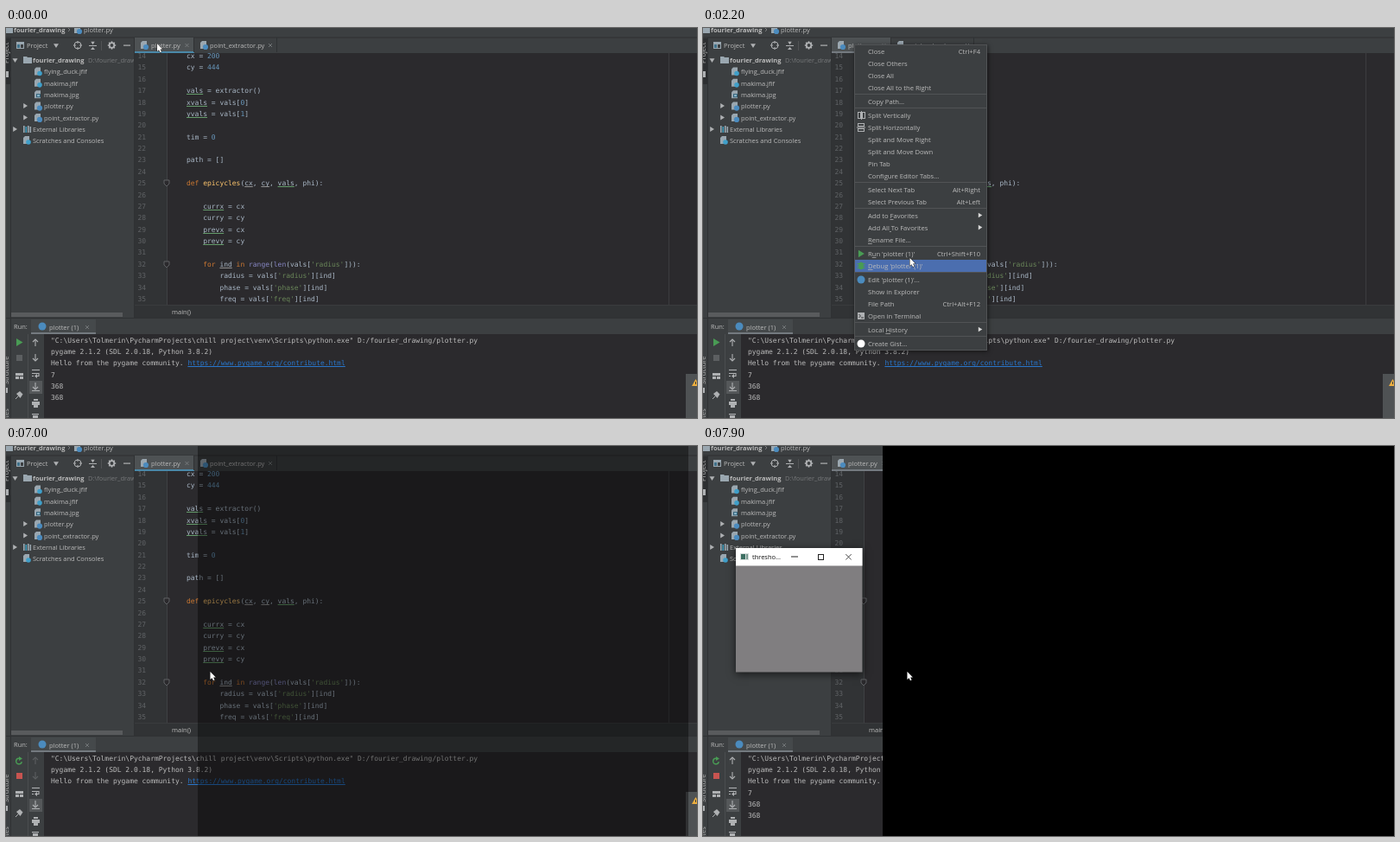
Write an HTML page with a canvas that moves like this. It is 800 px wide and 451 px high and loops after 8 s.

```html
<!DOCTYPE html>
<html lang="en">
<head>
<meta charset="utf-8">
<title>Running a script from the editor</title>
<style>
html, body { margin: 0; width: 100%; height: 100%; overflow: hidden; background: #2b2a2d; }
canvas { display: block; width: 800px; height: 451px; }
</style>
</head>
<body>
<canvas id="stage" width="800" height="451"></canvas>
<script>
const ctx = document.getElementById('stage').getContext('2d');
const LOOP = 8000, STEP = 100;
const UI = '7.5px "Open Sans", "Noto Sans", sans-serif';
const MENU = '7.65px "Open Sans", "Noto Sans", sans-serif';
const MONO = '7.97px "DejaVu Sans Mono", monospace';
const CHAR = 4.8, LINE = 13.37;
const C = {
  panel: '#3c3f41', editor: '#2b2a2d', gutter: '#313335', border: '#2f3133', text: '#bbbbbb',
  code: '#a9b7c6', dim: '#606366', icon: '#afb1b3', off: '#5c5f61', green: '#499c54',
  red: '#c75450', blue: '#4b6eaf', link: '#2876cc', python: '#4b8bbe', typo: '#659c6b'
};

const rect = (x, y, w, h, color) => { ctx.fillStyle = color; ctx.fillRect(x, y, w, h); };
function frame(x, y, w, h, color) {
  ctx.strokeStyle = color; ctx.lineWidth = 1;
  ctx.strokeRect(x + .5, y + .5, w - 1, h - 1);
}
function dot(x, y, r, color) {
  ctx.fillStyle = color;
  ctx.beginPath(); ctx.arc(x, y, r, 0, 7); ctx.fill();
}
function ring(x, y, r, color, width = 1) {
  ctx.strokeStyle = color; ctx.lineWidth = width;
  ctx.beginPath(); ctx.arc(x, y, r, 0, 7); ctx.stroke();
}
function trace(points) {
  ctx.beginPath();
  for (let i = 0; i < points.length; i += 2) ctx.lineTo(points[i], points[i + 1]);
}
function poly(color, ...points) { trace(points); ctx.fillStyle = color; ctx.fill(); }
function line(color, width, ...points) {
  trace(points);
  ctx.strokeStyle = color; ctx.lineWidth = width; ctx.stroke();
}
// y is the middle of the capitals
function text(str, x, y, color = C.text, font = UI, align = 'left') {
  ctx.font = font; ctx.fillStyle = color; ctx.textAlign = align;
  ctx.fillText(str, x, y + 2.8);
}
function clipped(x, y, w, h, draw) {
  ctx.save();
  ctx.beginPath(); ctx.rect(x, y, w, h); ctx.clip();
  draw();
  ctx.restore();
}
function sideText(str, y) {
  ctx.save();
  ctx.translate(.5, y); ctx.rotate(-Math.PI / 2);
  text(str, 0, 0);
  ctx.restore();
}

const triRight = (x, y, s, color) => poly(color, x - s * .6, y - s, x + s, y, x - s * .6, y + s);
const triDown = (x, y, s, color) => poly(color, x - s, y - s * .6, x + s, y - s * .6, x, y + s);
function cross(x, y, s, color, width = .8) {
  line(color, width, x - s, y - s, x + s, y + s);
  line(color, width, x + s, y - s, x - s, y + s);
}
function arrow(x, y, dir, color) {
  line(color, 1.1, x, y - 4 * dir, x, y + 4 * dir);
  line(color, 1.1, x - 3, y + dir, x, y + 4 * dir, x + 3, y + dir);
}
function folder(x, y) {
  poly('#9aa7b0', x, y - 4, x + 4, y - 4, x + 5, y - 3, x + 10, y - 3, x + 10, y + 4, x, y + 4);
}
function fileIcon(x, y, kind) {
  poly('#9aa7b0', x + 3, y - 5, x + 8, y - 5, x + 8, y + 4, x + 1, y + 4, x + 1, y - 3);
  if (kind === 'py') dot(x + 7, y + 2, 3.1, C.python);
  else if (kind === 'jfif') dot(x + 7, y + 2, 2.8, '#3f9fc9');
  else { rect(x + 3, y - 1, 5, 4, '#2f5f78'); rect(x + 4, y, 3, 2, '#8fb8cc'); }
}

function drawProject() {
  rect(0, 0, 800, 29, C.panel);
  folder(-2, 2);
  text('fourier_drawing', 9, 2, C.text, 'bold ' + UI);
  line('#787a7c', 1, 72, 0, 74, 2, 72, 4);
  fileIcon(78, 2, 'py');
  text('plotter.py', 90, 2);
  rect(0, 10.5, 800, 1, C.border);

  rect(0, 29, 149, 306, C.panel);
  rect(0, 12, 5, 53, '#2d2f31');
  sideText('Project', 41);
  rect(0, 50, 3, 7, C.icon);
  rect(5, 11, 1, 324, C.border);

  rect(12, 16, 9, 8, '#9aa7b0');
  rect(13, 19, 3, 4, '#40718a'); rect(17, 19, 3, 4, C.panel);
  text('Project', 24, 20.5);
  triDown(58, 20, 3, C.icon);
  ring(83, 20, 4, C.icon);
  line(C.icon, 1, 83, 15, 83, 18); line(C.icon, 1, 83, 22, 83, 25);
  line(C.icon, 1, 78, 20, 81, 20); line(C.icon, 1, 85, 20, 88, 20);
  line(C.icon, 1, 96, 20.5, 105, 20.5);
  triDown(100.5, 17, 2.2, C.icon);
  poly(C.icon, 98, 25, 100.5, 22, 103, 25);
  rect(110, 15, 1, 11, '#515355');
  ring(122.5, 20, 2.8, C.icon, 1.8);
  for (let i = 0; i < 8; i++) {
    const a = i * Math.PI / 4;
    line(C.icon, 1.5, 122.5 + 3 * Math.cos(a), 20 + 3 * Math.sin(a), 122.5 + 4.7 * Math.cos(a), 20 + 4.7 * Math.sin(a));
  }
  rect(136, 19.5, 8, 1.2, C.icon);

  triDown(10.5, 37, 3, C.icon);
  folder(20, 37);
  text('fourier_drawing', 31, 37, C.text, 'bold ' + UI);
  clipped(6, 29, 143, 20, () => text('D:\\fourier_drawing', 95, 37, '#77797b'));
  ['flying_duck.jfif', 'makima.jfif', 'makima.jpg', 'plotter.py', 'point_extractor.py'].forEach((name, i) => {
    const y = 50.5 + i * 13.35;
    fileIcon(32, y, name.split('.')[1]);
    text(name, 44, y);
    if (i > 2) triRight(22, y - .5, 3, C.icon);
  });
  triRight(10, 117, 3, C.icon);
  for (let i = 0; i < 4; i++) rect(20 + i * 2.5, 113 + i % 2, 1.6, 8 - i % 2, i === 1 ? '#40a0c0' : '#9aa7b0');
  text('External Libraries', 31, 117.2);
  fileIcon(19, 130, 'jfif');
  text('Scratches and Consoles', 31, 130.6);
  rect(6, 329, 129, 5, '#595b5d');
}

const source = {
  14: 'cx = 200', 15: 'cy = 444', 17: 'vals = extractor()', 18: 'xvals = vals[0]',
  19: 'yvals = vals[1]', 21: 'tim = 0', 23: 'path = []',
  25: 'def epicycles(cx, cy, vals, phi):',
  27: '    currx = cx', 28: '    curry = cy', 29: '    prevx = cx', 30: '    prevy = cy',
  32: "    for ind in range(len(vals['radius'])):",
  33: "        radius = vals['radius'][ind]",
  34: "        phase = vals['phase'][ind]",
  35: "        freq = vals['freq'][ind]"
};
// line, column, length, colour
const underlines = [
  [17, 0, 4, C.typo], [18, 0, 5, C.typo], [19, 0, 5, C.typo],
  [25, 14, 2, '#909090'], [25, 18, 2, '#909090'], [25, 22, 4, C.typo],
  [27, 4, 5, C.typo], [29, 4, 5, C.typo], [30, 4, 5, C.typo], [32, 8, 3, '#909090']
];
const lineY = n => 32.3 + (n - 14) * LINE;
function tokenColor(token) {
  if (token[0] === "'") return '#6a8759';
  if (/^\d/.test(token)) return '#6897bb';
  if (/^(def|for|in)$/.test(token)) return '#cc7832';
  if (/^(range|len)$/.test(token)) return '#8888c6';
  return token === 'epicycles' ? '#ffc66d' : C.code;
}

function drawTabs(focused) {
  rect(149, 11, 69, 18, '#4e5254');
  rect(149, 27, 69, 2, focused ? '#4a88a8' : '#747a80');
  rect(148, 11, 1, 324, C.border);
  rect(217, 11, 1, 17, C.border); rect(313, 11, 1, 17, C.border);
  fileIcon(155, 20, 'py');
  text('plotter.py', 168, 20.5);
  cross(209.5, 20, 2, '#7e8284');
  fileIcon(224, 20, 'py');
  text('point_extractor.py', 236, 20.5);
  cross(306, 20, 2, '#7e8284');
}

function drawEditor() {
  rect(149, 29, 651, 292, C.editor);
  rect(149, 29, 37, 292, C.gutter);
  rect(186, 29, 1, 292, '#3f4143');
  rect(767, 29, 1, 292, '#3c3c3f');
  clipped(149, 29, 651, 291.5, () => {
    for (let n = 14; n <= 35; n++) {
      text(String(n), 152.5, lineY(n), C.dim, MONO);
      const row = source[n] || '';
      for (const m of row.matchAll(/'[^']*'|\w+|[^\w\s]/g))
        text(m[0], 209 + m.index * CHAR, lineY(n), tokenColor(m[0]), MONO);
    }
    for (const [n, col, len, color] of underlines)
      rect(209 + col * CHAR, Math.round(lineY(n) + 4), len * CHAR, 1, color);
    for (const n of [25, 32]) {
      const y = Math.round(lineY(n));
      poly(C.editor, 183, y - 3, 189, y - 3, 189, y + 1, 186, y + 4, 183, y + 1);
      line('#6a6d70', .8, 183, y - 3, 189, y - 3, 189, y + 1, 186, y + 4, 183, y + 1, 183, y - 3);
    }
  });
  rect(149, 320.5, 651, 14.5, C.gutter);
  rect(149, 320, 651, 1, '#3a3c3e');
  text('main()', 192, 328.4);
}

const command = String.raw`"C:\Users\Tolmerin\PycharmProjects\chill project\venv\Scripts\python.exe" D:/fourier_drawing/plotter.py`;
const hello = 'Hello from the pygame community. ';

function drawConsole(rows, running, arrowsOn) {
  rect(0, 335, 800, 19, C.panel);
  rect(0, 335, 800, 1, C.border);
  text('Run:', 9, 345.5);
  rect(29, 337, 75, 17, '#45494b');
  rect(29, 352, 75, 2, '#747a80');
  dot(42, 345, 4.5, C.python);
  text('plotter (1)', 50, 345.7);
  cross(94, 346, 2, '#7e8284');

  rect(0, 354, 44, 97, C.panel);
  rect(44, 354, 756, 97, C.editor);
  rect(5, 335, 1, 116, C.border); rect(25, 354, 1, 97, '#4b4e50');
  sideText('Structure', 412);
  rect(0, 416, 2, 6, C.icon);
  sideText('Favorites', 472);

  if (running) {
    ctx.strokeStyle = C.green; ctx.lineWidth = 1.5;
    ctx.beginPath(); ctx.arc(15, 364.5, 3.3, .2, 4.9); ctx.stroke();
    poly(C.green, 15, 359, 19, 361.5, 15, 364);
    rect(12, 378, 7, 7, C.red);
  } else {
    poly(C.green, 12, 359, 19.5, 363.5, 12, 368);
    rect(12, 378, 7, 7, C.off);
  }
  rect(11, 399, 9, 3, C.icon); rect(11, 403, 4, 3, C.icon); rect(16, 403, 4, 3, C.icon);
  line(C.icon, 1, 11, 429, 14.5, 425.5);
  poly(C.icon, 12, 423, 16, 420, 19.5, 423.5, 16.5, 428);
  const color = arrowsOn ? C.icon : C.off;
  arrow(34, 364, -1, color);
  arrow(34, 381, 1, color);
  line(C.icon, 1.1, 30, 395.5, 39, 395.5);
  line(C.icon, 1.1, 30, 399.5, 38, 399.5, 38, 402.5, 34, 402.5);
  line(C.icon, 1.1, 30, 402.5, 32, 402.5);
  poly(C.icon, 33, 402.5, 36, 400, 36, 405);
  rect(27, 408, 15, 15, '#55585a');
  arrow(34, 414, 1, C.icon);
  rect(30, 419, 9, 1, C.icon);
  rect(30, 432, 9, 4, C.icon); rect(32, 429, 5, 2, C.icon); rect(32, 436, 5, 3, C.icon);
  rect(30, 446, 8, 1.2, C.icon); rect(31, 448, 6, 3, C.icon);

  const lines = [command, 'pygame 2.1.2 (SDL 2.0.18, Python 3.8.2)', hello, '7', '368', '368'];
  lines.slice(0, rows).forEach((str, i) => text(str, 52, 361 + i * 13.3, C.text, MONO));
  if (rows > 2) {
    const x = 52 + hello.length * CHAR;
    text('https://www.pygame.org/contribute.html', x, 387.6, C.link, MONO);
    rect(x, 391, 38 * CHAR, 1, C.link);
  }
  rect(787, 400, 13, 51, '#4f5254');
  poly('#edae3f', 794, 414, 798.5, 406, 803, 414);
  rect(798, 409, 1, 3, '#3c3f41');
}

// label, shortcut; '>' opens a submenu, '-' is a separator
const menuSpec = `Close|Ctrl+F4
Close Others
Close All
Close All to the Right
-
Copy Path...
-
Split Vertically
Split Horizontally
Split and Move Right
Split and Move Down
Pin Tab
Configure Editor Tabs...
-
Select Next Tab|Alt+Right
Select Previous Tab|Alt+Left
-
Add to Favorites|>
Add All To Favorites|>
Rename File...
-
Run 'plotter (1)'|Ctrl+Shift+F10
Debug 'plotter (1)'
-
Edit 'plotter (1)'...
Show in Explorer
File Path|Ctrl+Alt+F12
Open in Terminal
-
Local History|>
-
Create Gist...`;
const ROW = 14.05, GAP = 1.85;
let nextY = 27;
const menu = menuSpec.split('\n').map(row => {
  const [label, key] = row.split('|');
  if (label === '-') { nextY += GAP; return { separator: nextY - 9 }; }
  const item = { label, key, y: nextY };
  nextY += ROW;
  return item;
});
const mnemonics = { 'Run': 1, 'Debug': 0, 'Rename': 0, 'Local': 6, 'Add': 7 };

function menuIcon(label, y) {
  if (label === 'Split Vertically') {
    frame(179, y - 4, 4, 8, C.icon); frame(184, y - 4, 4, 8, C.icon); rect(183, y - 5, 1, 10, C.icon);
  } else if (label === 'Split Horizontally') {
    frame(179, y - 5, 8, 4, C.icon); frame(179, y + 1, 8, 4, C.icon); rect(178, y - .5, 10, 1, C.icon);
  } else if (label.startsWith('Run')) triRight(182.5, y, 4.3, C.green);
  else if (label.startsWith('Debug')) {
    for (const d of [-2.5, 0, 2.5]) line(C.green, 1, 178.5, y + d, 187.5, y + d);
    ctx.fillStyle = C.green;
    ctx.beginPath(); ctx.ellipse(183, y, 2.8, 4.3, 0, 0, 7); ctx.fill();
  } else if (label.startsWith('Edit')) dot(183, y, 4.5, C.python);
  else if (label === 'Open in Terminal') {
    rect(179, y - 4, 8, 8, C.icon); line(C.panel, 1, 180.5, y - 2, 182.5, y, 180.5, y + 2);
    rect(183, y + 1.5, 3, 1, C.panel);
  } else if (label.startsWith('Create')) dot(183, y, 4.5, '#ffffff');
}

function drawMenu(hoverY) {
  ctx.save();
  ctx.shadowColor = 'rgba(0,0,0,.55)'; ctx.shadowBlur = 5; ctx.shadowOffsetX = ctx.shadowOffsetY = 1;
  rect(175, 19, 154, 354, C.panel);
  ctx.restore();
  frame(175, 19, 154, 354, '#515355');
  for (const { label, key, y, separator } of menu) {
    if (separator) { rect(176, Math.round(separator), 152, 1, '#515355'); continue; }
    if (Math.abs(hoverY - y) <= ROW / 2) rect(176, Math.round(y - 7), 152, 14, C.blue);
    menuIcon(label, Math.round(y));
    text(label, 191, y, C.text, MENU);
    const at = mnemonics[label.split(' ')[0]];
    if (at !== undefined) {
      const left = ctx.measureText(label.slice(0, at)).width;
      rect(191 + left, Math.round(y + 4), ctx.measureText(label[at]).width, .7, C.text);
    }
    if (key === '>') triRight(320.5, y - .5, 2.8, '#d8d8d8');
    else if (key) text(key, 321, y, C.text, MENU, 'right');
  }
}

// time, x, y
const path = [
  [700, 175, 18], [800, 196, 50], [900, 224, 97], [1000, 236, 107], [1200, 239, 160],
  [1400, 240, 221], [1600, 240, 261], [1700, 240, 270], [1900, 240, 281], [2100, 240, 271],
  [2200, 239.5, 266], [2500, 236.5, 261]
];
function pointer(t) {
  const i = path.findIndex(p => p[0] >= t);
  if (i === 0) return path[0].slice(1);
  if (i < 0) return path[path.length - 1].slice(1);
  const [t0, x0, y0] = path[i - 1], [t1, x1, y1] = path[i], k = (t - t0) / (t1 - t0);
  return [x0 + (x1 - x0) * k, y0 + (y1 - y0) * k];
}
function drawPointer([x, y]) {
  const shape = [0, 0, 0, 9, 2, 7.2, 3.5, 10.3, 5, 9.6, 3.6, 6.6, 6.3, 6.4];
  ctx.save();
  ctx.translate(x, y);
  line('#1a1a1a', 1, ...shape, 0, 0);
  poly('#ffffff', ...shape);
  ctx.restore();
}
function drawBeam(x, y) {
  line('#d4d4d4', 1, x + .5, y - 4, x + .5, y + 4);
  rect(x - 1, y - 4.5, 3, 1, '#d4d4d4'); rect(x - 1, y + 3.5, 3, 1, '#d4d4d4');
}

function drawThreshold(t) {
  const step = (t - 7600) / STEP;
  const scale = [.93, .98, .995, 1][step], cx = 111, cy = 190;
  ctx.save();
  ctx.globalAlpha = [.4, .8, .95, 1][step];
  ctx.translate(cx, cy); ctx.scale(scale, scale); ctx.translate(-cx, -cy);
  ctx.save();
  ctx.shadowColor = 'rgba(0,0,0,.6)'; ctx.shadowBlur = 9; ctx.shadowOffsetY = 2;
  rect(38, 118, 146.5, 143.5, '#807e80');
  ctx.restore();
  rect(38, 118, 146.5, 20.5, '#ffffff');
  rect(43, 124, 10, 8, '#d5dcda'); rect(44, 125, 5, 6, '#3d6f62'); rect(50, 125, 2, 6, '#7a9a92');
  text('thresho...', 57, 128.3, '#111111');
  rect(102, 127.5, 8, 1, '#222222');
  frame(133, 125, 7, 7, '#222222');
  cross(168.5, 128.3, 3.2, '#222222');
  ctx.restore();
}

function draw(t) {
  const started = t >= 3000, menuOpen = t >= 300 && t < 2900;
  const rows = !started || t >= 7600 ? 6 : t < 3100 ? 0 : t < 5200 ? 1 : 3;
  drawProject();
  drawTabs(!menuOpen && t < 7600);
  drawEditor();
  drawConsole(rows, started, !started || t >= 7200);
  if (menuOpen) drawMenu(t < 800 ? -99 : pointer(t - STEP)[1]);
  if (t >= 7000) {
    const step = Math.min(3, (t - 7000) / STEP);
    const left = [222, 211, 209, 208][step];
    rect(left, 0, [790, 798, 800, 800][step] - left, 451, `rgba(0,0,0,${[.4, .8, .96, 1][step]})`);
  }
  if (t >= 7600) drawThreshold(t);
  if (t >= 2900 && t < 7000) drawBeam(237, 261);
  else drawPointer(pointer(t));
}

function tick() {
  const t = performance.now() % LOOP;
  draw(Math.floor(t / STEP) * STEP);
  requestAnimationFrame(tick);
}
tick();
</script>
</body>
</html>
```
